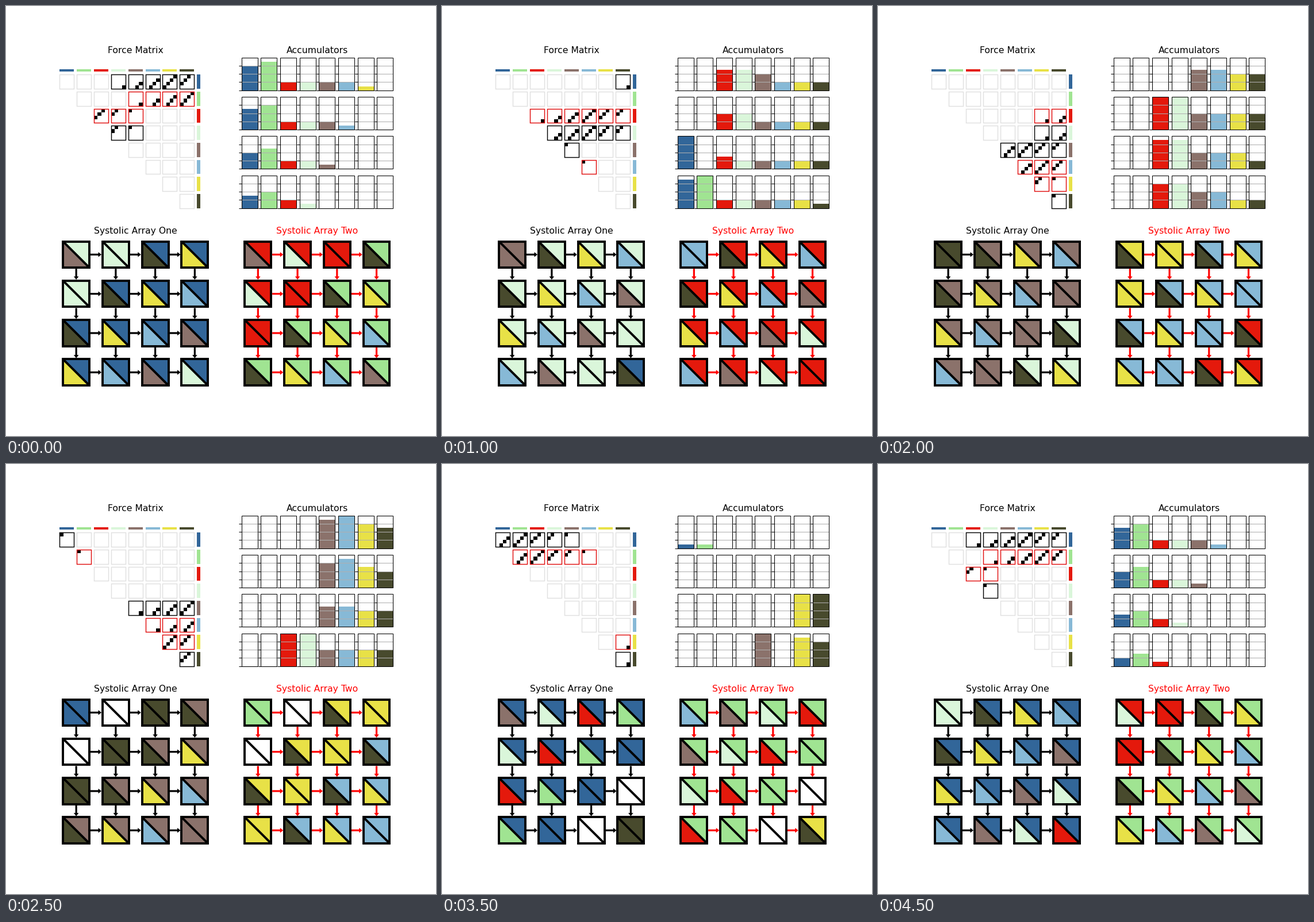
Write a matplotlib script that moves like this. It is 748 px wide and 748 px high and loops after 4750 ms.

```python
import matplotlib.pyplot as plt
from matplotlib.animation import FuncAnimation
from matplotlib.collections import PolyCollection
from matplotlib.patches import Polygon, Rectangle

SIZE = 748
DPI = 93.5
PT = DPI / 72
STEPS = 19
BLOCKS = 8
LANES = 4
PHASE = 9  # schedule position at time zero

COLORS = ["#326699", "#a0e492", "#e4190c", "#daf6da",
          "#8b726b", "#87b9d6", "#e8e147", "#484a2d"]
IDLE_EDGE = "#e0e0e0"

# Panel geometry: a 2 x 2 grid with gaps of a fifth of a panel.
LEFT, TOP = 0.125 * SIZE, 0.12 * SIZE
PANEL_W = 0.775 * SIZE / 2.2
PANEL_H = 0.77 * SIZE / 2.2
LEFT2, TOP2 = LEFT + 1.2 * PANEL_W, TOP + 1.2 * PANEL_H


def jobs(rows):
    return [(r, c) for r in rows for c in range(r, BLOCKS)]


ARRAYS = [(LEFT, "black", jobs([0, 3, 4, 7])),
          (LEFT2, "red", jobs([1, 2, 5, 6]))]

fig = plt.figure(figsize=(SIZE / DPI, SIZE / DPI), dpi=DPI, facecolor="white")
ax = fig.add_axes([0, 0, 1, 1])
ax.set_xlim(0, SIZE)
ax.set_ylim(SIZE, 0)
ax.axis("off")


def slot(x, y, rows, cols, r, c):
    """Box of one slot in a panel split into a grid with 20% gaps."""
    w = PANEL_W / (cols + 0.2 * (cols - 1))
    h = PANEL_H / (rows + 0.2 * (rows - 1))
    return x + 1.2 * w * c, y + 1.2 * h * r, w, h


def rect(x, y, w, h, face="none", edge="none", lw=0.0, z=1.0):
    return ax.add_patch(Rectangle((x, y), w, h, facecolor=face,
                                  edgecolor=edge, linewidth=lw, zorder=z))


def tri(points, z=1):
    return ax.add_patch(Polygon(points, facecolor="white", linewidth=0, zorder=z))


def title(x, y, text, color="black"):
    ax.text(x + PANEL_W / 2, y - 6 * PT, text, color=color, fontsize=12,
            family="DejaVu Sans", ha="center", va="baseline")


def arrow(x, y, length, color, down=False):
    """Solid arrow starting at (x, y), pointing right or down."""
    neck = length - 5.5
    shape = [(0, -1.6), (neck, -1.6), (neck, -4.3), (length, 0),
             (neck, 4.3), (neck, 1.6), (0, 1.6)]
    pts = [(x + v, y + u) if down else (x + u, y + v) for u, v in shape]
    ax.add_patch(Polygon(pts, facecolor=color, linewidth=0, zorder=2))


def build_matrix():
    title(LEFT, TOP, "Force Matrix")
    boxes = {}
    for i, color in enumerate(COLORS):
        x, y, w, h = slot(LEFT, TOP, 9, 9, 0, i)
        rect(x, y + 0.8 * h, w, 0.2 * h, color)
        x, y, w, h = slot(LEFT, TOP, 9, 9, i + 1, 8)
        rect(x, y, 0.25 * w, h, color)
        for c in range(i, BLOCKS):
            boxes[i, c] = rect(*slot(LEFT, TOP, 9, 9, i + 1, c),
                               edge=IDLE_EDGE, lw=1.1, z=2)
    return boxes


def build_accumulators():
    title(LEFT2, TOP, "Accumulators")
    bars = {}
    for a in range(LANES):
        for b, color in enumerate(COLORS):
            x, y, w, h = slot(LEFT2, TOP, LANES, BLOCKS, a, b)
            bars[a, b] = rect(x, y + h, w, 0, color)
            for level in range(0, 8, 2):
                ly = y + h * (1 - level / 8)
                ax.plot([x, x + w], [ly, ly], color="#b0b0b0", lw=0.8,
                        solid_capstyle="butt", zorder=1.5)
                ax.plot([x - 3.5 * PT, x], [ly, ly], color="black", lw=0.8,
                        solid_capstyle="butt", zorder=2)
            rect(x, y, w, h, edge="black", lw=0.8, z=2.5)
    return bars


def build_array(left, color):
    cells = {}
    edge = 1.5 * PT
    for i in range(LANES):
        for j in range(LANES):
            x, y, w, h = slot(left, TOP2, LANES, LANES, i, j)
            x0, x1 = x + 0.1 * w, x + 0.9 * w
            y0, y1 = y + 0.1 * h, y + 0.9 * h
            cells[i, j] = (tri([(x0, y0), (x1, y0), (x1, y1)]),
                           tri([(x0, y0), (x0, y1), (x1, y1)]))
            ax.plot([x0, x1], [y0, y1], color="black", lw=3, zorder=2,
                    solid_capstyle="butt")
            rect(x0, y0, x1 - x0, y1 - y0, edge="black", lw=3, z=3)
            if j < LANES - 1:
                arrow(x1 + edge, y + h / 2, 0.4 * w - 2 * edge, color)
            if i < LANES - 1:
                arrow(x + w / 2, y1 + edge, 0.4 * h - 2 * edge, color, down=True)
    return cells


boxes = build_matrix()
bars = build_accumulators()
grids = [build_array(left, color) for left, color, _ in ARRAYS]
title(LEFT, TOP2, "Systolic Array One")
title(LEFT2, TOP2, "Systolic Array Two", "red")
dots = PolyCollection([], facecolors="black", linewidths=0, zorder=1.8)
dots.set_snap(True)
ax.add_collection(dots, autolim=False)

# Schedule positions of every job that touches each block.
starts = [[k for _, _, plan in ARRAYS for k, job in enumerate(plan) if b in job]
          for b in range(BLOCKS)]


def dot_squares(box, age):
    x, y = box.get_xy()
    w, h = box.get_width() / 4, box.get_height() / 4
    for i in range(LANES):
        j = age - i
        if 0 <= j < LANES:
            l, t = x + j * w, y + i * h
            yield [(l, t), (l + w, t), (l + w, t + h), (l, t + h)]


def update(t):
    squares = []
    for (_, color, plan), cells in zip(ARRAYS, grids):
        for (i, j), (upper, lower) in cells.items():
            p = (t + PHASE - i - j) % STEPS
            busy = p < len(plan)
            upper.set_facecolor(COLORS[plan[p][0]] if busy else "white")
            lower.set_facecolor(COLORS[plan[p][1]] if busy else "white")
        for k, job in enumerate(plan):
            age = (t + PHASE - k) % STEPS
            active = age < 2 * LANES - 1
            boxes[job].set_edgecolor(
                ("black" if color == "black" else "#e00c0c") if active else IDLE_EDGE)
            if active:
                squares += dot_squares(boxes[job], age)
    dots.set_verts(squares)

    for (a, b), bar in bars.items():
        p = (t + PHASE - a - LANES) % STEPS
        # A finished accumulator is drained one step after its last job.
        count = sum(k <= p for k in starts[b]) if p <= max(starts[b]) else 0
        _, y, _, h = slot(LEFT2, TOP, LANES, BLOCKS, a, b)
        bar.set_y(y + h * (1 - count / 8))
        bar.set_height(h * count / 8)
    return []


anim = FuncAnimation(fig, update, frames=STEPS, interval=250,
                     repeat=True, repeat_delay=0, blit=False)
plt.show()
```
